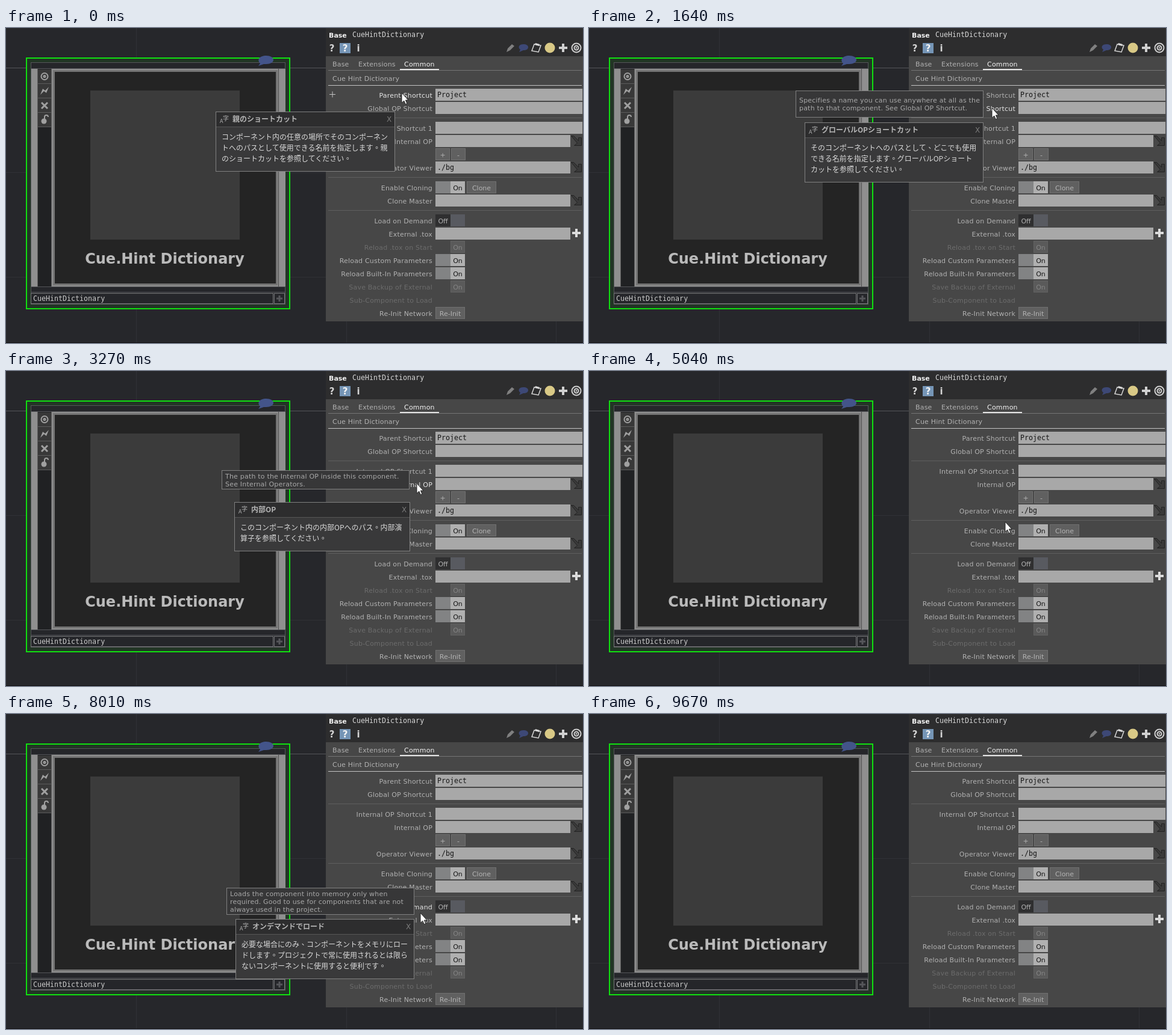
An HTML page that plays this animation: 958x524 px, repeating every 10000 ms.

```html
<!DOCTYPE html>
<html lang="en">
<head>
<meta charset="utf-8">
<title>Parameter help</title>
<style>
html, body { margin: 0; width: 100%; height: 100%; overflow: hidden; background: #26272b; }
svg { display: block; width: 958px; height: 524px; }
text { font: 11px "DejaVu Sans", sans-serif; letter-spacing: .2px; fill: #b2b2b2; white-space: pre; }
.end { text-anchor: end; }
.mid { text-anchor: middle; letter-spacing: 0; }
.mono { font: 11.65px "DejaVu Sans Mono", monospace; letter-spacing: 0; }
.dim { fill: #6c6c6c; }
.lit { fill: #f2f2f2; }
.ink { fill: #161616; }
.native { fill: #a9a9a9; }
.ja { font: 12px "Noto Sans CJK JP", "Noto Sans CJK", sans-serif; letter-spacing: 0; fill: #b4b4b4; }
.body { font-family: "Noto Sans CJK TC", "Noto Sans CJK", sans-serif; fill: #dadada; }
.bold { font-weight: bold; }
.big { font: bold 24px "DejaVu Sans", sans-serif; letter-spacing: 0; text-anchor: middle; fill: #bababa; }
#cursor { animation: travel 10s infinite; }
@keyframes travel {
  0% { transform: translate(657px, 108px); }
  .7% { transform: translate(657px, 108px); animation-timing-function: steps(14, start); }
  11.1% { transform: translate(668px, 126px); }
  16.4% { transform: translate(668px, 126px); animation-timing-function: steps(1, start); }
  17.1% { transform: translate(669px, 133px); animation-timing-function: steps(8, start); }
  22.6% { transform: translate(675px, 158px); }
  27.9% { transform: translate(675px, 158px); animation-timing-function: steps(5, start); }
  31.4% { transform: translate(682px, 187px); }
  38.6% { transform: translate(682px, 187px); animation-timing-function: steps(6, start); }
  42.7% { transform: translate(687px, 222px); }
  50.4% { transform: translate(687px, 222px); animation-timing-function: steps(1, start); }
  51.1% { transform: translate(691px, 251px); animation-timing-function: steps(1, start); }
  51.8% { transform: translate(691px, 256px); }
  56.3% { transform: translate(691px, 256px); animation-timing-function: steps(6, start); }
  60.9% { transform: translate(685px, 284px); }
  71.4% { transform: translate(685px, 284px); animation-timing-function: steps(1, start); }
  72.1% { transform: translate(688px, 311px); }
  79.4% { transform: translate(688px, 311px); animation-timing-function: steps(1, start); }
  80.1% { transform: translate(688px, 321px); animation-timing-function: steps(1, start); }
  80.8% { transform: translate(688px, 331px); animation-timing-function: steps(7, start); }
  85.7%, 100% { transform: translate(690px, 540px); }
}
</style>
</head>
<body>
<svg viewBox="0 0 958 524" xmlns="http://www.w3.org/2000/svg">
  <!-- network grid -->
  <rect width="958" height="524" fill="#26272b"/>
  <path d="M216.5 0V524M565.5 0V524M913.5 0V524M0 240.5H958M0 414.5H958" stroke="#303136"/>
  <path d="M0 66.5H531" stroke="#55565a"/>
  <path d="M0 523.5H958" stroke="#101012"/>

  <!-- component -->
  <rect x="34" y="50" width="437" height="417" fill="#223525" stroke="#10e010" stroke-width="2"/>
  <g fill="#25262a" stroke="#55565a">
    <rect x="41.5" y="57.5" width="422" height="402"/>
    <path d="M41 67.5H464M41 430.5H464M41 439.5H464"/>
    <rect x="41.5" y="441.5" width="402" height="17" stroke="#77787a"/>
    <rect x="445.5" y="441.5" width="17" height="17" stroke="#77787a"/>
  </g>
  <path d="M449 450h10M454 445v10" stroke="#55565a" stroke-width="3"/>
  <rect x="42" y="68" width="422" height="362" fill="#8f8f8f"/>
  <rect x="52" y="68" width="24" height="362" fill="#202123"/>
  <rect x="53" y="69" width="22" height="95" fill="#383838"/>
  <path d="M53 92.5H75M53 116.5H75M53 140.5H75M53 164.5H75M52.5 68V430M75.5 68V430" stroke="#5c5c5c"/>
  <path d="M452.5 68V430" stroke="#4a4a4a"/>
  <rect x="78" y="70" width="373" height="358" fill="#747474"/>
  <rect x="81" y="73" width="367" height="352" fill="#242424"/>
  <g fill="none" stroke="#a0a0a0" stroke-width="2">
    <circle cx="64" cy="80.500" r="5.500"/><circle cx="64" cy="80.500" r="1.500"/>
    <path d="M59 124l10 10M69 124l-10 10" stroke-width="3"/>
    <path d="M64 151v-3a3 3 0 0 1 6 0"/>
  </g>
  <path d="M57 111l4-10 4 3 6-6-4 10-4-3z" fill="#a0a0a0"/>
  <circle cx="63" cy="155" r="4.500" fill="#a0a0a0"/>
  <rect x="140" y="104" width="248" height="248" fill="#3b3b3b"/>
  <text class="big" x="263.500" y="392">Cue.Hint Dictionary</text>
  <text class="mono" x="45" y="454" style="fill:#cacaca">CueHintDictionary</text>
  <path d="M432 46c7 0 12 3 12 7s-5 7-12 7l-4 0-9 3 3-4c-6-6-1-13 10-13z" fill="#43548a"/>

  <!-- parameter window -->
  <rect x="531" width="427" height="488" fill="#474747"/>
  <rect x="531" width="427" height="47" fill="#2d2d2e"/>
  <text class="bold lit" x="536" y="16" style="letter-spacing:0">Base</text>
  <text class="mono" x="575" y="15" style="fill:#d6d6d6">CueHintDictionary</text>
  <rect x="554" y="25" width="18" height="17" fill="#7595b6"/>
  <g style="font-size:15px">
    <text class="bold mid" x="541" y="39" style="font-size:inherit;fill:#d6d6d6">?</text>
    <text class="bold mid" x="563" y="39" style="font-size:inherit;fill:#f4f4f4">?</text>
    <text class="bold mid" x="585" y="39" style="font-size:inherit;fill:#d6d6d6">i</text>
  </g>
  <path d="M831 40l2-6 7-7 4 3-7 7z" fill="#808080"/>
  <path d="M859 27c5 0 8 2 8 5s-3 5-8 5l-7 3 2-4c-5-4-2-9 5-9z" fill="#3d4876"/>
  <path d="M877 27l11 2-4 11-11-2z" fill="#2d2d2e" stroke="#d8d8d8" stroke-width="1.500"/>
  <path d="M879 25l7 2-1 3-7-2z" fill="#d8d8d8"/>
  <circle cx="903" cy="33" r="8.500" fill="#d9c986"/>
  <path d="M918 33h14M925 26v14" stroke="#d0d0d0" stroke-width="4"/>
  <g fill="none" stroke="#cfcfcf" stroke-width="2">
    <circle cx="947" cy="33" r="7.500"/><circle cx="947" cy="33" r="3.500"/>
  </g>
  <circle cx="947" cy="33" r="1.300" fill="#cfcfcf"/>
  <text x="542" y="64">Base</text>
  <text x="585" y="64">Extensions</text>
  <text class="lit" x="661" y="64">Common</text>
  <path d="M535 70.5H956" stroke="#757575"/>
  <path d="M654 69H719" stroke="#e4e4e4" stroke-width="2"/>
  <text x="542" y="88">Cue Hint Dictionary</text>
  <path d="M535 95.5H956" stroke="#c4c4c4"/>
  <path d="M535 149.5H956M535 248.5H956M535 303.5H956" stroke="#5e5e5e"/>

  <g id="rows"></g>
  <g id="tips"></g>
  <path id="cursor" d="M0 0V16.500L3.800 13 6.300 18.700 8.800 17.600 6.400 12H11z" fill="#fff" stroke="#1a1a1a" stroke-width=".9"/>
</svg>
<script>
const byId = id => document.getElementById(id);
const sheet = document.head.appendChild(document.createElement('style'));
let serial = 0, css = '';

// Style attribute that switches a property to `b` from `on` to `off` (ms) in each loop.
function cycle(on, off, prop, a, b) {
  const name = 'cycle' + serial++;
  css += `@keyframes ${name}{0%{${prop}:${a}}${on / 100}%{${prop}:${b}}${off / 100}%,100%{${prop}:${a}}}`;
  return `style="animation:${name} 10s step-end infinite"`;
}
const timed = (on, off, inner) => `<g ${cycle(on, off, 'visibility', 'hidden', 'visible')}>${inner}</g>`;
const text = (x, y, s, cls = '', extra = '') => `<text x="${x}" y="${y}" class="${cls}" ${extra}>${s}</text>`;
const box = (x, y, w, h, fill, line) => line
  ? `<rect x="${x + .5}" y="${y + .5}" width="${w - 1}" height="${h - 1}" fill="${fill}" stroke="${line}"/>`
  : `<rect x="${x}" y="${y}" width="${w}" height="${h}" fill="${fill}"/>`;
const cell = (x, y, w, fill, line) => box(x, y - 11, w, 20, fill, line);
const button = (x, y, w, s) => cell(x, y, w, '#606060', '#707070') + text(x + w / 2, y + 4, s, 'mid');
const field = (y, w, s) => cell(713, y, w, '#a8a8a8') + text(716, y + 3, s, 'mono ink');

const control = {
  wide: (y, s) => field(y, 244, s),
  pick: (y, s) => field(y, 224, s) +
    `<path d="M938.5 ${y - 9.5}h4l8 8v-5h5v13h-12l5-4z" fill="#3a3a3a" stroke="#222"/>`,
  file: y => field(y, 224, '') +
    `<path d="M940 ${y - 2}h14M947 ${y - 9}v14" stroke="#dcdcdc" stroke-width="4"/>`,
  pair: y => button(713, y, 24, '+') + button(739, y, 24, '-'),
  on: (y, s) => cell(713, y, 49, '#828384') + cell(738, y, 24, '#b0b0b0') +
    text(750, y + 4, 'On', 'mid ink') + (s ? button(765, y, 49, s) : ''),
  off: y => cell(713, y, 49, '#2f2f30') + cell(738, y, 24, '#585a60') + text(725.5, y + 4, 'Off', 'mid'),
  dead: y => cell(738, y, 24, '#5a5a5a', '#626262') + text(750, y + 4, 'On', 'mid', 'style="fill:#858585"'),
  none: () => '',
  push: (y, s) => button(713, y, 49, s)
};

// centre, label, control, value, hover start, hover end
const rows = [
  [112, 'Parent Shortcut', 'wide', 'Project', 0, 900],
  [134, 'Global OP Shortcut', 'wide', '', 900, 1920],
  [167, 'Internal OP Shortcut 1', 'wide', '', 2120, 3000],
  [189, 'Internal OP', 'pick', '', 3000, 4000],
  [211, '', 'pair'],
  [233, 'Operator Viewer', 'pick', './bg', 4210, 5040],
  [266, 'Enable Cloning', 'on', 'Clone', 5110, 5910],
  [288, 'Clone Master', 'pick', '', 5910, 7140],
  [321, 'Load on Demand', 'off', '', 7140, 8080],
  [343, 'External .tox', 'file'],
  [365, 'Reload .tox on Start', 'dead'],
  [387, 'Reload Custom Parameters', 'on'],
  [409, 'Reload Built-In Parameters', 'on'],
  [431, 'Save Backup of External', 'dead'],
  [453, 'Sub-Component to Load', 'none'],
  [475, 'Re-Init Network', 'push', 'Re-Init']
];
byId('rows').innerHTML = rows.map(([y, label, kind, value = '', on, off]) => {
  const dim = kind === 'dead' || kind === 'none';
  const glow = off ? cycle(on, off, 'fill', '#b2b2b2', '#e6e6e6') : '';
  const plus = off ? timed(on, off,
    `<path d="M537 ${y - 1.5}h10M542 ${y - 6.5}v10" stroke="#c4c4c4"/>`) : '';
  return text(708, y + 4, label, dim ? 'end dim' : 'end', glow) + control[kind](y, value) + plus;
}).join('');

function nativeTip(on, off, x, y, w, h, lines) {
  const top = y + h / 2 - (lines.length - 1) * 6.5 + 4;
  return timed(on, off, box(x, y, w, h, '#373738', '#808080') +
    lines.map((s, i) => text(x + 6, top + i * 13, s, 'native')).join(''));
}
function helpTip(on, off, x, y, w, title, lines) {
  const h = 46 + lines.length * 18;
  return timed(on, off, box(x, y, w, h, '#39393a', '#808080') + box(x + 1, y + 1, w - 2, 24, '#2d2d2e') +
    `<path d="M${x + 1} ${y + 25.5}h${w - 2}" stroke="#565656"/>` +
    text(x + 7, y + 19, 'A', 'ja', 'style="font-size:9px"') +
    text(x + 12, y + 15, '字', 'ja', 'style="font-size:10px"') +
    text(x + 28, y + 17, title, 'ja bold', 'lang="ja"') +
    text(x + w - 10, y + 17, 'X', 'mid', 'style="font-size:12px;fill:#7c7c7c"') +
    lines.map((s, i) => text(x + 10, y + 46.5 + i * 18, s, 'ja body', 'lang="zh-Hant"')).join(''));
}

byId('tips').innerHTML = [
  helpTip(0, 140, 348, 139, 298, '親のショートカット', [
    'コンポーネント内の任意の場所でそのコンポーネン',
    'トへのパスとして使用できる名前を指定します。親',
    'のショートカットを参照してください。']),
  nativeTip(1170, 1710, 343, 104, 312, 45, [
    'Specifies a name you can use anywhere at all as the',
    'path to that component. See Global OP Shortcut.']),
  helpTip(1310, 1710, 358, 157, 297, 'グローバルOPショートカット', [
    'そのコンポーネントへのパスとして、どこでも使用',
    'できる名前を指定します。グローバルOPショート',
    'カットを参照してください。']),
  nativeTip(2390, 2860, 352, 136, 312, 45, [
    'Specifies a name you can use inside this component',
    'as the path to the Internal OP. See Internal',
    'Operators.']),
  helpTip(2460, 2860, 366, 189, 298, '内部OPショートカット 1', [
    'このコンポーネント内で内部OPへのパスとして使用',
    'できる名前を指定します。内部演算子を参照してく',
    'ださい。']),
  nativeTip(3200, 3930, 358, 165, 312, 32, [
    'The path to the Internal OP inside this component.',
    'See Internal Operators.']),
  helpTip(3270, 3930, 379, 218, 292, '内部OP', [
    'このコンポーネント内の内部OPへのパス。内部演',
    '算子を参照してください。']),
  nativeTip(4380, 5040, 362, 200, 314, 45, [
    'The path to the operator whose viewer is displayed',
    'on this component when its node viewer is turned',
    'on.']),
  helpTip(4450, 5040, 379, 250, 297, 'オペレータビューア', [
    'ノードビューアがオンの場合に、このコンポーネン',
    'トに表示するオペレータへのパスを指定します。こ',
    'のコンポーネント内のオペレータも指定することが',
    'できます。']),
  nativeTip(5360, 5700, 366, 234, 314, 45, [
    'Controls whether this component is cloned from the',
    'Clone Master. When this is off, changes to the',
    'master are ignored.']),
  helpTip(5430, 5700, 383, 285, 297, 'クローンを有効化', [
    'このコンポーネントをクローンするかどうかを指定',
    'します。オフの場合、マスターの変更は反映されま',
    'せん。']),
  nativeTip(6410, 7140, 394, 270, 283, 19, ['Path to a component used as the Master Clone.']),
  helpTip(6480, 7140, 376, 314, 299, 'クローンマスター', [
    'マスタークローンとして使用されるコンポーネント',
    'へのパス。']),
  nativeTip(7340, 8080, 366, 289, 312, 45, [
    'Loads the component into memory only when',
    'required. Good to use for components that are not',
    'always used in the project.']),
  helpTip(7410, 8080, 381, 341, 297, 'オンデマンドでロード', [
    '必要な場合にのみ、コンポーネントをメモリにロー',
    'ドします。プロジェクトで常に使用されるとは限ら',
    'ないコンポーネントに使用すると便利です。'])
].join('');
sheet.textContent = css;
</script>
</body>
</html>
```
